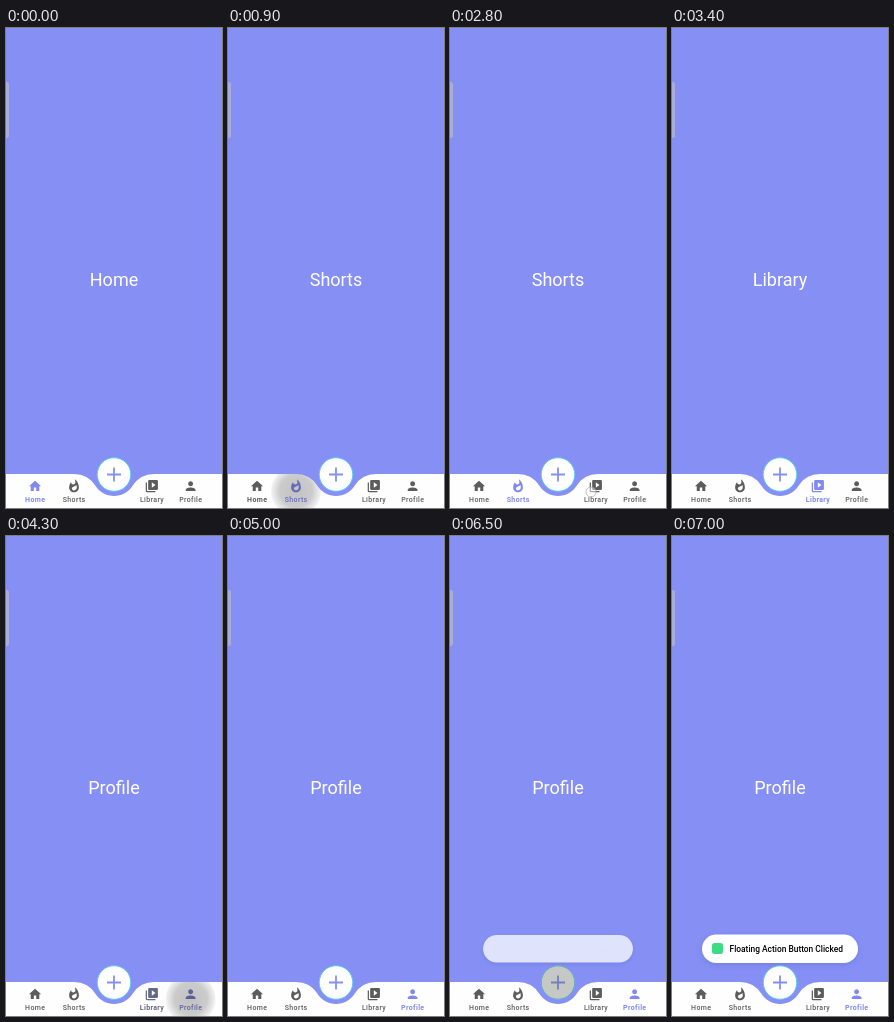
Animation, 216 px wide and 480 px high, one loop 8000 ms. Source, as an HTML page:

```html
<!DOCTYPE html>
<html lang="en">
<head>
<meta charset="utf-8">
<title>Bottom navigation</title>
<style>
  html, body { margin: 0; width: 100%; height: 100%; overflow: hidden; background: #858ff4; }
  svg { display: block; width: 216px; height: 480px; font-family: Roboto, sans-serif; }
  text { text-anchor: middle; }
  .label { font-size: 7px; letter-spacing: .35px; }
</style>
</head>
<body>
<svg viewBox="0 0 216 480">
  <defs>
    <radialGradient id="ink">
      <stop offset="0" stop-opacity=".24"/>
      <stop offset=".65" stop-opacity=".2"/>
      <stop offset="1" stop-opacity=".04"/>
    </radialGradient>
    <filter id="soft" x="-20%" y="-50%" width="140%" height="220%"><feGaussianBlur stdDeviation="3"/></filter>
    <path id="bar" d="M0 446H68A25.4 25.4 0 0 1 89.4 457.8A22 22 0 0 0 126.6 457.8A25.4 25.4 0 0 1 148 446H216V480H0Z"/>
    <clipPath id="barClip"><use href="#bar"/></clipPath>
  </defs>
  <rect width="216" height="480" fill="#858ff4"/>
  <path d="M0 54h1q2 0 2 3v50q0 3-2 3H0z" fill="#a9add9"/>
  <text id="title" x="108" y="258" font-size="18" fill="#fff"></text>

  <use href="#bar" fill="#fefefe"/>
  <g id="items"></g>
  <g clip-path="url(#barClip)"><circle id="ripple" cy="463" fill="url(#ink)"/></g>

  <circle cx="108" cy="446.5" r="16.8" fill="#fff" stroke="#5cc8f0"/>
  <path d="M101 446.5h14M108 439.5v14" stroke="#858ff4" stroke-width="1.8"/>
  <circle id="press" cx="108" cy="446.5" r="17" fill="#555d50"/>
  <circle id="touch" r="5" fill="#fff" fill-opacity=".45" stroke="#999" stroke-width=".6"/>

  <g id="toast">
    <rect x="31" y="401" width="154" height="27" rx="13.5" fill="#4c55b0" opacity=".35" filter="url(#soft)"/>
    <rect x="30" y="398.5" width="156" height="28.5" rx="14.25" fill="#fff"/>
    <g id="message">
      <rect x="40" y="407" width="11" height="11" rx="2.5" fill="#3ddc84"/>
      <text x="114.3" y="416" font-size="8.4" font-weight="500">Floating Action Button Clicked</text>
    </g>
  </g>
</svg>
<script>
const LOOP = 8000;
const GREY = [92, 92, 92], BLUE = [128, 137, 240];
const tabs = [
  ['Home', 29, 'M10 20v-6h4v6h5v-8h3L12 3 2 12h3v8z'],
  ['Shorts', 68, 'M13.5.67s.74 2.65.74 4.8c0 2.06-1.35 3.73-3.41 3.73-2.07 0-3.63-1.67-3.63-3.73l.03-.36C5.21 7.51 4 10.62 4 14c0 4.42 3.58 8 8 8s8-3.58 8-8C20 8.61 17.41 3.8 13.5.67zM11.71 19c-1.78 0-3.22-1.4-3.22-3.14 0-1.62 1.05-2.76 2.81-3.12 1.77-.36 3.6-1.21 4.62-2.58.39 1.29.59 2.65.59 4.04 0 2.65-2.15 4.8-4.8 4.8z'],
  ['Library', 145.8, 'M4 6H2v14c0 1.1.9 2 2 2h14v-2H4V6zm16-4H8c-1.1 0-2 .9-2 2v12c0 1.1.9 2 2 2h12c1.1 0 2-.9 2-2V4c0-1.1-.9-2-2-2zm-8 12.5v-9l6 4.5-6 4.5z'],
  ['Profile', 184.6, 'M12 12c2.21 0 4-1.79 4-4s-1.79-4-4-4-4 1.79-4 4 1.79 4 4 4zm0 2c-2.67 0-8 1.34-8 4v2h16v-2c0-2.66-5.33-4-8-4z']
];
// Each tap: start, end, tab index (4 = round button), touch point
const taps = [
  [500, 1300, 1, 70, 461],
  [2800, 3400, 2, 141, 464],
  [4000, 4700, 3, 182, 463],
  [6300, 7000, 4, 108, 448]
];

const $ = id => document.getElementById(id);
const set = (el, attrs) => { for (const k in attrs) el.setAttribute(k, attrs[k]); };
const ramp = (x, a, b) => Math.min(1, Math.max(0, (x - a) / (b - a)));
const mix = k => `rgb(${GREY.map((g, i) => Math.round(g + (BLUE[i] - g) * k))})`;

$('items').innerHTML = tabs.map(([name, x, d]) => `<g>
  <path d="${d}" transform="translate(${x - 7.3} 450.9) scale(.61)"/>
  <text class="label" x="${x + .2}" y="474">${name}</text></g>`).join('');
const items = [...$('items').children];

function draw(t) {
  const tint = [1, 0, 0, 0];
  let page = 0, bold = 0, rippleX = 0, rippleR = 0, rippleA = 0, press = 0, touch = null;
  for (const [start, end, tab, x, y] of taps) {
    const p = (t - start) / (end - start);
    if (p < 0) break;
    if (p < .25) touch = [x, y];
    const grow = ramp(p, .1, .3), fade = 1 - ramp(p, .5, .95);
    if (tab === 4) {
      press = .36 * grow * fade;
      continue;
    }
    const k = ramp(p, .25, .5);
    tint.forEach((v, i) => tint[i] = i === tab ? k : v * (1 - k));
    if (p > .35) page = tab;
    if (p > .6) bold = tab;
    rippleX = tabs[tab][1];
    rippleR = 25 * grow;
    rippleA = fade;
  }
  $('title').textContent = tabs[page][0];
  items.forEach((el, i) => set(el, { fill: mix(tint[i]), 'font-weight': i === bold ? 700 : 500 }));
  set($('ripple'), { cx: rippleX, r: rippleR, opacity: rippleA });
  set($('press'), { opacity: press });
  set($('touch'), touch ? { cx: touch[0], cy: touch[1], opacity: 1 } : { opacity: 0 });

  const s = .93 + .07 * ramp(t, 6400, 6630);
  set($('toast'), {
    opacity: ramp(t, 6400, 6535),
    transform: `translate(108 412.7) scale(${s}) translate(-108 -412.7)`
  });
  set($('message'), { opacity: ramp(t, 6500, 6700) });
}

const origin = performance.now();
function tick() {
  draw((performance.now() - origin) % LOOP);
  requestAnimationFrame(tick);
}
tick();
</script>
</body>
</html>
```
